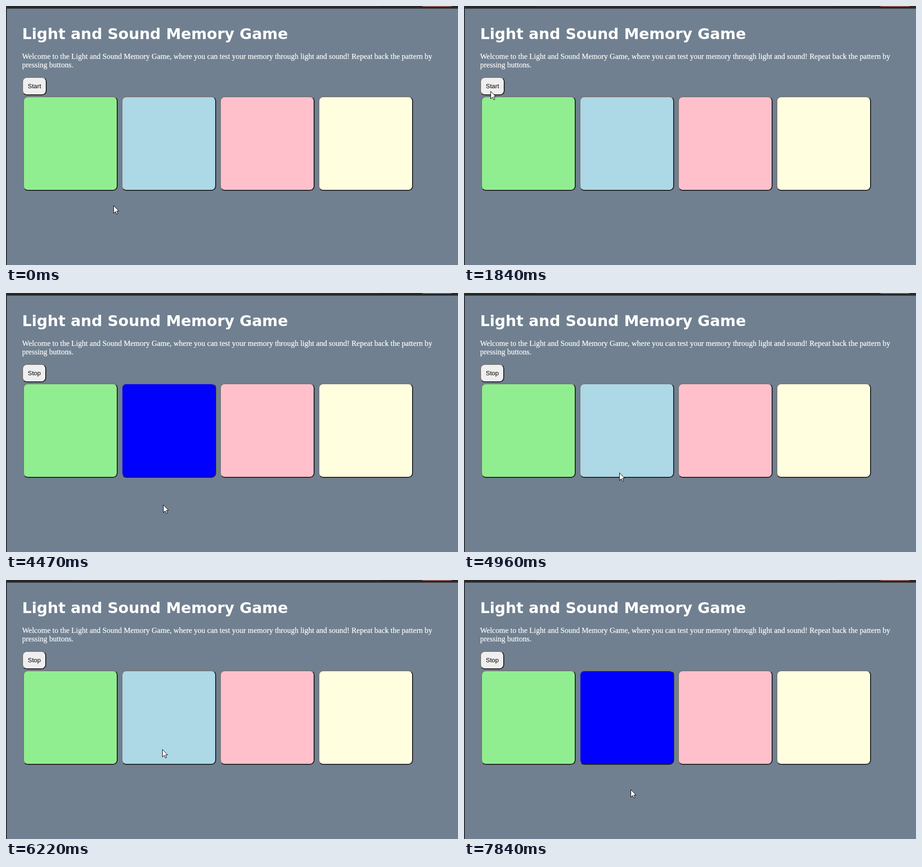
Write an HTML page that moves like this. It is 955 px wide and 548 px high and loops after 7990 ms.

```html
<!DOCTYPE html>
<html lang="en">
<head>
<meta charset="utf-8">
<title>Light and Sound Memory Game</title>
<style>
  html, body { margin: 0; width: 100%; height: 100%; overflow: hidden; }
  body { position: relative; background: #708090; color: #fff; }
  body * { position: absolute; box-sizing: border-box; margin: 0; white-space: nowrap; }
  br { position: static; }
  h1 { left: 34px; top: 39px; font: bold 31.75px/40px "DejaVu Sans", sans-serif; }
  p { left: 34px; top: 98px; font: 16px/18px "Liberation Serif", serif; -webkit-text-stroke: .2px; }
  .bar { left: 0; top: 0; width: 100%; height: 6px; background: #282828; border-bottom: 1px solid #4a4f56; overflow: hidden; }
  .field { left: 152px; top: 0; width: 637px; height: 1px; background: #383838; }
  .pill { left: 871px; top: -23px; width: 79px; height: 24px; border-radius: 12px; background: #f28b82; }
  .edge { left: 0; top: 0; width: 2px; height: 100%; background: #1c1c1e; border-right: 1px solid #3c444c; }
  .button {
    border: 2px solid; border-color: #767676 #222 #222 #767676;
    border-radius: 10px; background: #efefef; color: #000;
  }
  .button.pressed { border-color: #222 #767676 #767676 #222; }
  #toggle { left: 34px; top: 150px; height: 39px; padding: 10px; font: 13.333px/15px "Liberation Sans", sans-serif; }
  .tile { top: 191px; width: 200px; height: 200px; }
  #cursor { left: 0; top: 0; width: 13px; height: 20px; }
</style>
</head>
<body>
  <div class="bar"><div class="field"></div><div class="pill"></div></div>
  <div class="edge"></div>
  <h1>Light and Sound Memory Game</h1>
  <p>Welcome to the Light and Sound Memory Game, where you can test your memory through light and sound! Repeat back the pattern by<br>pressing buttons.</p>
  <div id="toggle" class="button">Start</div>
  <svg id="cursor" viewBox="0 0 13 20">
    <path d="M.5 .5V16.5L4.3 12.9 6.8 18.5 9.3 17.5 6.9 12H11.5Z" fill="#fff" stroke="#000"/>
  </svg>
<script>
  const LOOP = 7990;
  const STEP = 120;

  const START_CLICK = 2650;
  const PRESS = { from: 5390, to: 6220 };
  const LIT = [{ from: 3680, to: 4590 }, PRESS, { from: 7300, to: LOOP }];

  // Resting and turning points of the pointer.
  const path = [
    { t: 850, x: 227, y: 422 },
    { t: 1690, x: 46, y: 209 },
    { t: 1840, x: 56, y: 180 },
    { t: 2080, x: 63, y: 158 },
    { t: 2960, x: 63, y: 158 },
    { t: 3080, x: 72, y: 135 },
    { t: 3560, x: 276, y: 415 },
    { t: 3810, x: 316, y: 465 },
    { t: 4350, x: 332, y: 448 },
    { t: 4720, x: 332, y: 448 },
    { t: 5110, x: 325, y: 337 },
    { t: 6100, x: 325, y: 337 },
    { t: 6720, x: 350, y: 448 },
    { t: 7570, x: 350, y: 448 },
    { t: 7840, x: 352, y: 443 }
  ];

  const byId = id => document.getElementById(id);
  const during = (t, span) => t >= span.from && t < span.to;

  const tiles = ["lightgreen", "lightblue", "pink", "lightyellow"].map((color, i) => {
    const tile = document.createElement("div");
    tile.className = "button tile";
    tile.style.left = `${36 + 208 * i}px`;
    tile.style.background = color;
    byId("cursor").before(tile);
    return tile;
  });
  const blue = tiles[1];

  function pointerAt(t) {
    const next = path.findIndex(point => point.t > t);
    if (next === 0) return path[0];
    if (next < 0) return path.at(-1);
    const a = path[next - 1], b = path[next];
    const part = Math.floor((t - a.t) / STEP) * STEP / (b.t - a.t);
    const mix = (from, to) => Math.round(from + (to - from) * part);
    return { x: mix(a.x, b.x), y: mix(a.y, b.y) };
  }

  function draw(t) {
    const { x, y } = pointerAt(t);
    byId("cursor").style.transform = `translate(${x}px, ${y}px)`;
    byId("toggle").textContent = t < START_CLICK ? "Start" : "Stop";
    blue.style.background = LIT.some(span => during(t, span)) ? "blue" : "lightblue";
    blue.classList.toggle("pressed", during(t, PRESS));
  }

  const begin = performance.now();
  function tick() {
    draw((performance.now() - begin) % LOOP);
    requestAnimationFrame(tick);
  }
  tick();
</script>
</body>
</html>
```
